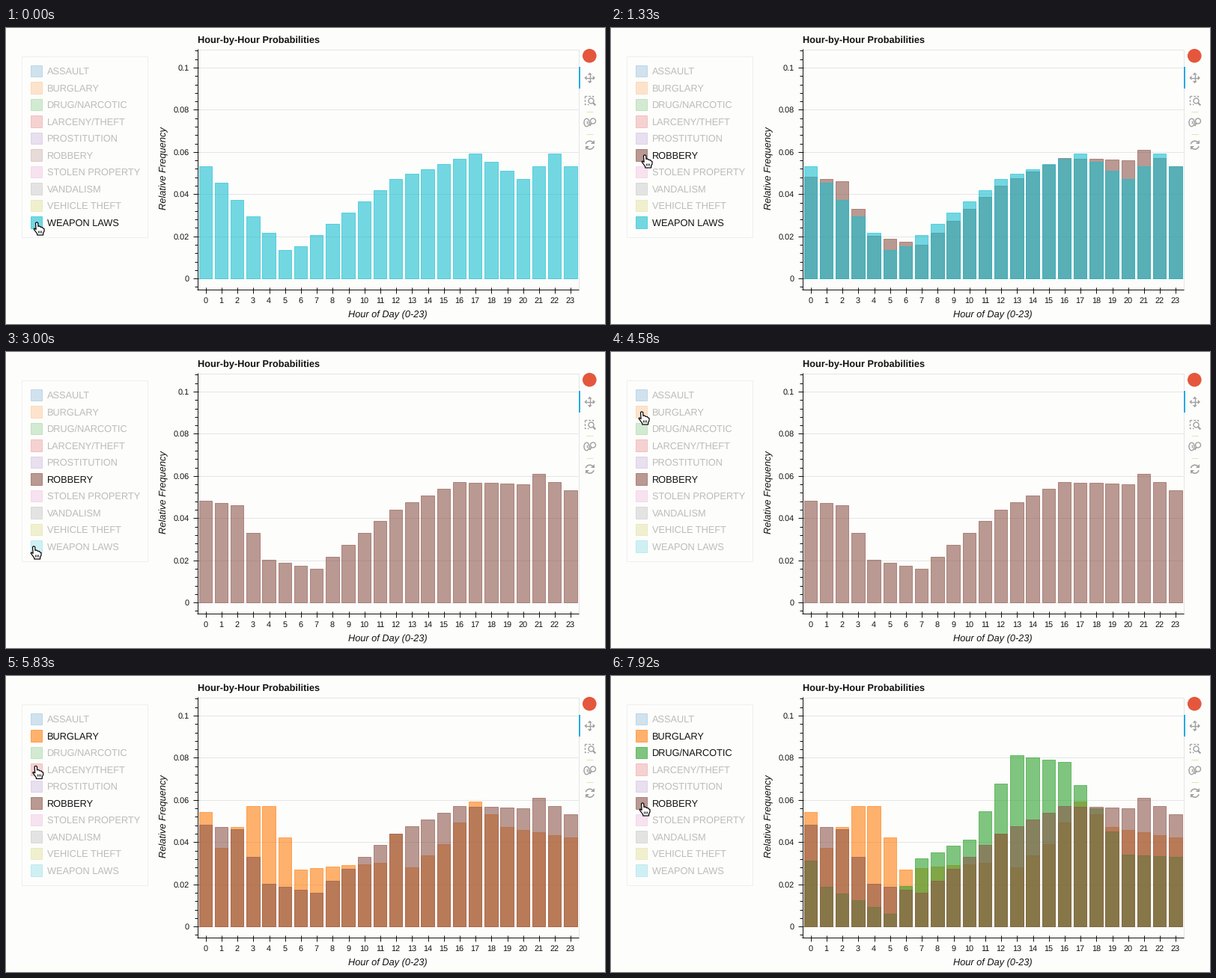
A matplotlib script for the animation above (8000 ms loop, 800 by 396 pixels).

```python
import numpy as np
import matplotlib.pyplot as plt
from matplotlib.animation import FuncAnimation
from matplotlib.collections import PolyCollection
from matplotlib.patches import Arc, Circle, Ellipse, Polygon, Rectangle

W, H, DPI = 800, 396, 100
FRAMES, STEP = 100, 80
PX = 72 / DPI

BG = "#fdfdfc"
INK = "#111111"
MUTED_INK = "#bcbcbc"
ICON = "#a1a1a1"
RULE = "#e5e5e5"
ON, MUTED = 0.6, 0.2

plt.rcParams["font.family"] = "Liberation Sans"
plt.rcParams["text.hinting"] = "none"

# Row order also picks the colour (C0 to C9) and the stacking
LABELS = ["ASSAULT", "BURGLARY", "DRUG/NARCOTIC", "LARCENY/THEFT",
          "PROSTITUTION", "ROBBERY", "STOLEN PROPERTY", "VANDALISM",
          "VEHICLE THEFT", "WEAPON LAWS"]
BURGLARY, DRUG, LARCENY, ROBBERY, WEAPON = 1, 2, 3, 5, 9

# Turning points of each daily curve: hour, frequency in percent
CURVES = {
    BURGLARY: [(0, 5.4), (1, 3.7), (3, 5.7), (4, 5.7), (6, 2.7), (11, 3.0),
               (12, 4.4), (13, 2.8), (15, 3.9), (17, 5.9), (19, 4.7), (23, 4.2)],
    DRUG: [(0, 3.1), (1, 1.85), (5, 0.6), (7, 3.2), (10, 4.1),
           (13, 8.1), (16, 7.8), (20, 3.4), (23, 3.3)],
    ROBBERY: [(0, 4.8), (2, 4.6), (4, 2.0), (7, 1.6), (12, 4.4),
              (16, 5.7), (20, 5.6), (21, 6.1), (23, 5.3)],
    WEAPON: [(0, 5.3), (5, 1.35), (6, 1.5), (12, 4.7), (17, 5.9),
             (20, 4.7), (22, 5.9), (23, 5.3)],
}

# Clicks on the legend: time, row
CLICKS = [(1150, ROBBERY), (2600, WEAPON), (4800, BURGLARY), (6250, DRUG)]

# Pointer moves: start, end, row, x
MOVES = [(350, 1000, ROBBERY, 45), (1850, 2450, WEAPON, 37),
         (3300, 4300, BURGLARY, 41), (5100, 5500, LARCENY, 39),
         (5580, 6200, DRUG, 42), (6850, 7500, ROBBERY, 42)]

HAND = np.array([
    (-1.5, 1), (-0.6, 0), (0.8, 0), (1.8, 1), (2, 5.5), (3.2, 5), (4.6, 5.5),
    (5, 6.3), (7.6, 6.6), (8, 7.5), (10, 8.6), (10, 12), (8.6, 14.4),
    (8.6, 17), (0.8, 17), (0.6, 15.2), (-3.8, 9.2), (-3.2, 8), (-0.9, 9.4),
])

fig = plt.figure(figsize=(W / DPI, H / DPI), dpi=DPI, facecolor=BG)
ax = fig.add_axes([0, 0, 1, 1])
ax.set_xlim(0, W)
ax.set_ylim(H, 0)
ax.axis("off")


def px_y(value):
    return 334.7 - 2822 * value


def px_x(hour):
    return 266.3 + 21.2 * hour


def row_y(row):
    return 57.5 + 22.5 * row


def crisp(v):
    return np.floor(v) + 0.5


def line(xs, ys, color=INK, width=1.0, **kw):
    kw.setdefault("solid_capstyle", "butt")
    return ax.plot(xs, ys, color=color, lw=width * PX, **kw)[0]


def text(x, y, s, size, **kw):
    kw.setdefault("color", INK)
    return ax.text(x, y, s, fontsize=size * PX, va="baseline", **kw)


def box(x, y, w, h, face="none", edge="none"):
    return ax.add_patch(Rectangle((x, y), w, h, fc=face, ec=edge, lw=PX))


def draw_plot():
    box(255.5, 28.5, 509, 321, edge=RULE)
    for k in range(6):
        y = crisp(px_y(0.02 * k))
        line([256, 764], [y, y], RULE, zorder=1)
        line([249.8, 257.4], [y, y], zorder=5)
        text(244.7, y + 4, f"{0.02 * k:g}", 10.9, ha="right")
    for k in range(-1, 28):
        y = crisp(px_y(0.004 * k))
        line([251.7, 255.5], [y, y], zorder=5)
    for h in range(24):
        x = crisp(px_x(h))
        line([x, x], [347, 354.8], zorder=5)
        text(px_x(h), 368, str(h), 10.9, ha="center")
    line([255.5, 255.5], [28, 349.5], zorder=5)
    line([255, 764.5], [349.5, 349.5], zorder=5)
    text(255.6, 20, "Hour-by-Hour Probabilities", 12.75, weight="bold")
    text(510, 387.5, "Hour of Day (0-23)", 12.75, style="italic", ha="center")
    text(214.2, 187.5, "Relative Frequency", 12.85, style="italic",
         ha="center", rotation=90, rotation_mode="anchor")


def draw_bars(row):
    hours = np.arange(24)
    rates = np.interp(hours, *zip(*CURVES[row])) / 100
    left = px_x(hours) - 8.7
    right = np.minimum(px_x(hours) + 8.7, 764)
    verts = [[(a, px_y(0)), (b, px_y(0)), (b, px_y(r)), (a, px_y(r))]
             for a, b, r in zip(left, right, rates)]
    bars = PolyCollection(verts, facecolors=f"C{row}", edgecolors=f"C{row}",
                          linewidths=PX, alpha=ON, zorder=2 + row / 10)
    ax.add_collection(bars, autolim=False)
    return bars


def draw_legend():
    box(20.5, 37.5, 168, 242, edge="#efefef")
    return [(box(32.5, row_y(i) - 8, 15.5, 15.5, f"C{i}", f"C{i}"),
             text(55, row_y(i) + 4.6, label, 12.8))
            for i, label in enumerate(LABELS)]


def ring(x, y, w, h):
    ax.add_patch(Ellipse((x, y), w, h, fc="none", ec=ICON, lw=1.4 * PX))


def triangle(*points):
    ax.add_patch(Polygon(points, fc=ICON, ec="none"))


def draw_toolbar():
    ax.add_patch(Circle((779.3, 37.2), 9.3, fc="#e4573d", ec="none"))
    line([765.5, 765.5], [52, 81], "#26aae1", 2, zorder=6)
    # Pan
    cx, cy = 779.7, 66.8
    line([cx - 5, cx + 5], [cy, cy], ICON, 1.4)
    line([cx, cx], [cy - 5, cy + 5], ICON, 1.4)
    for dx, dy in [(1, 0), (-1, 0), (0, 1), (0, -1)]:
        tip = np.array([cx + 7.3 * dx, cy + 7.3 * dy])
        back, side = np.array([dx, dy]) * 3.2, np.array([dy, dx]) * 3
        triangle(tip, tip - back + side, tip - back - side)
    # Box zoom
    line([773, 784, 784], [90.5, 90.5, 93], ICON, 1.4, ls=(0, (2, 1.4)))
    line([773, 773, 778], [90.5, 101.5, 101.5], ICON, 1.4, ls=(0, (2, 1.4)))
    ring(781.5, 97.5, 7, 7)
    line([784, 787.3], [100, 103.5], ICON, 2.2)
    # Wheel zoom
    ring(775.5, 126.5, 7, 10.5)
    line([775.5, 775.5], [123.5, 127.5], ICON, 1.4)
    ring(784, 124.5, 7, 7)
    line([782, 779.5], [127, 131], ICON, 2)
    # Reset
    for start in (15, 195):
        ax.add_patch(Arc((779.7, 156.7), 11, 11, theta1=start,
                         theta2=start + 135, ec=ICON, lw=1.6 * PX))
    triangle((785.8, 150.3), (785.8, 155.3), (780.8, 155.3))
    triangle((773.6, 163.1), (773.6, 158.1), (778.6, 158.1))
    for y in (111.5, 141.5):
        line([774.5, 784], [y, y], "#e6e2b0")


draw_plot()
draw_toolbar()
legend = draw_legend()
bars = {row: draw_bars(row) for row in CURVES}
hand = ax.add_patch(Polygon(HAND, closed=True, fc="white", ec="black",
                            lw=1.2 * PX, joinstyle="round", zorder=10))
creases = [line([], [], "black", 0.9, zorder=11) for _ in range(3)]


def pointer(t):
    pos = np.array([41, row_y(WEAPON)])
    for start, end, row, x in MOVES:
        u = np.clip((t - start) / (end - start), 0, 1)
        pos = pos + (np.array([x, row_y(row)]) - pos) * u * u * (3 - 2 * u)
    return pos


def active_rows(t):
    active = {WEAPON}
    for start, row in CLICKS:
        if t >= start:
            active ^= {row}
    return active


def update(i):
    t = i * STEP
    active = active_rows(t)
    for row, layer in bars.items():
        layer.set_visible(row in active)
    for row, (swatch, label) in enumerate(legend):
        swatch.set_alpha(ON if row in active else MUTED)
        label.set_color(INK if row in active else MUTED_INK)
    x, y = pointer(t)
    hand.set_xy(HAND + (x, y))
    for k, crease in enumerate(creases):
        cx = x + 2.4 + 2 * k
        crease.set_data([cx, cx], [y + 10.5, y + 14])
    return []


anim = FuncAnimation(fig, update, frames=FRAMES, interval=STEP,
                     init_func=lambda: update(0), repeat=True,
                     repeat_delay=0, blit=False)
plt.show()
```
